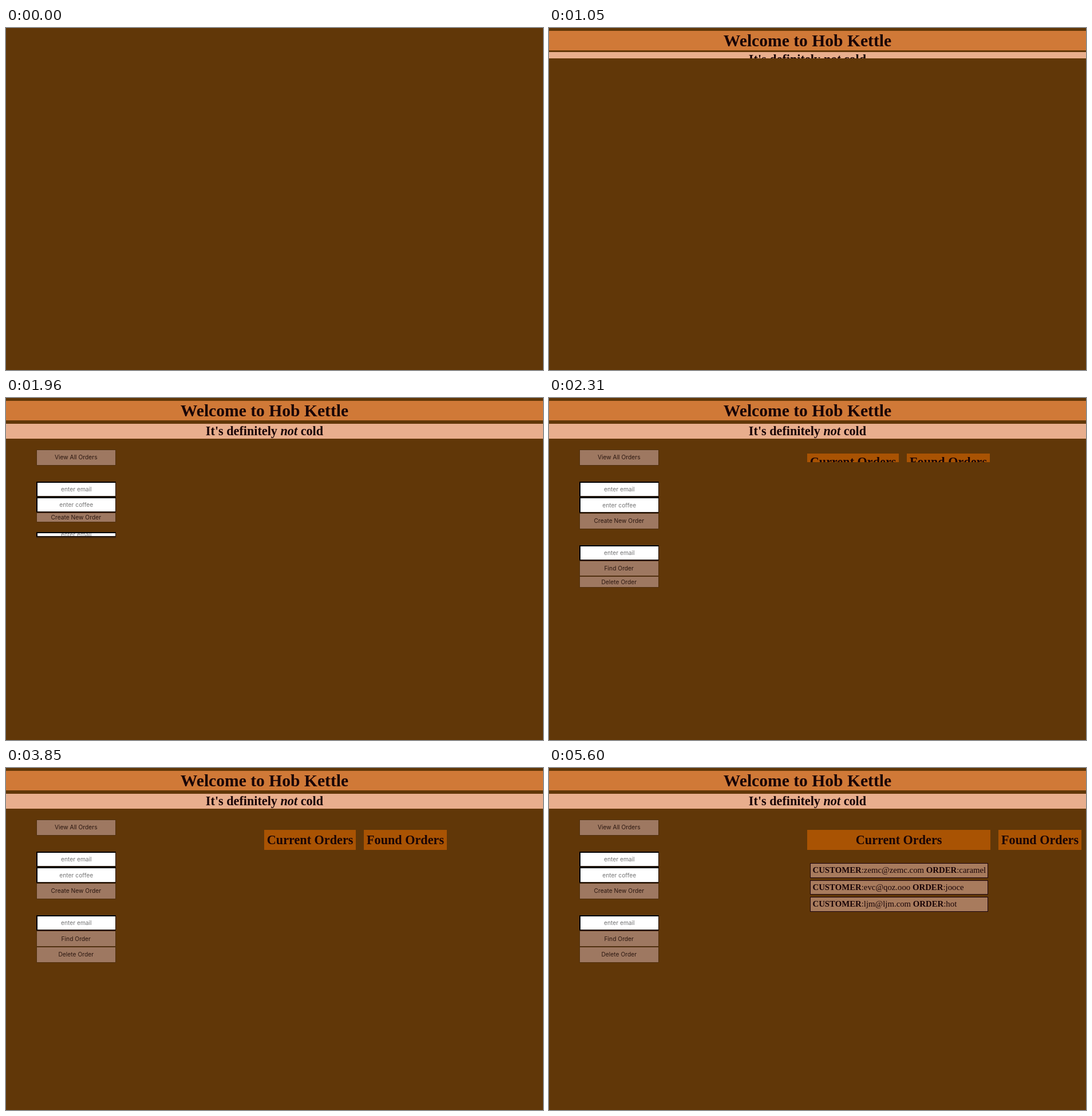
Animation of 938x597 px, one loop 5.74 s. Source, as an HTML page:

```html
<!DOCTYPE html>
<html lang="en">
<head>
<meta charset="utf-8">
<title>Coffee orders</title>
<style>
  html, body { margin: 0; width: 100%; height: 100%; overflow: hidden; background: #613708; }
  body { position: relative; font: 14.8px "Liberation Serif", "Times New Roman", serif; color: #190407; }
  h1, h2 { margin: 0; box-sizing: content-box; overflow: hidden; white-space: nowrap; text-align: center; }
  .banner { position: absolute; top: 0; left: 0; width: 938px; display: flex; flex-direction: column; }
  .banner > * { padding-right: 35px; }
  h1 { height: 34px; margin-top: 5px; font-size: 29.6px; line-height: 34px; background: #d07937; }
  h2 { font-size: 22.2px; }
  .banner h2 { height: 26px; margin-top: 6px; line-height: 26px; background: #e8ae8d; }

  .controls { position: absolute; left: 53px; top: 90px; width: 138.5px; display: flex; flex-direction: column; }
  .button, .field {
    display: flex; flex: none; align-items: center; justify-content: center; overflow: hidden;
    font: 10.25px/13px Inter, sans-serif; white-space: nowrap; border: 1px solid;
  }
  .button { height: 25.75px; background: #9e7861; color: #2b1710; border-color: #50300f; }
  .field { height: 23.75px; background: #fff; color: #757575; border-width: 2px; border-color: #000 #22140a #22140a #000; border-right-width: 1px; }
  .gap { margin-bottom: 27.75px; }

  .lists { position: absolute; left: 451px; top: 89px; display: flex; align-items: flex-start; gap: 14px; }
  .lists h2 { flex: none; height: 25.5px; line-height: 25.5px; margin-top: 19px; padding: 4.75px 4.6px; background: #a95303; }
  #current { width: 151px; }
  #found { width: 135.5px; }
  #orders { position: absolute; left: 456px; top: 166px; width: 311px; }
  #orders div {
    box-sizing: border-box; height: 25.5px; margin-bottom: 4px; padding-left: 3.5px;
    border: 1px solid #1c0512; background: #a87b5d; line-height: 23px; white-space: nowrap;
  }
</style>
</head>
<body>
  <div class="banner">
    <h1 id="title">Welcome to Hob Kettle</h1>
    <h2 id="tagline">It's definitely <em>not</em> cold</h2>
  </div>

  <div class="controls">
    <div class="button gap" id="viewAll">View All Orders</div>
    <div class="field">enter email</div>
    <div class="field">enter coffee</div>
    <div class="button gap">Create New Order</div>
    <div class="field">enter email</div>
    <div class="button">Find Order</div>
    <div class="button">Delete Order</div>
  </div>

  <div class="lists">
    <h2 id="current">Current Orders</h2>
    <h2 id="found">Found Orders</h2>
  </div>

  <div id="orders">
    <div><b>CUSTOMER</b>:zemc@zemc.com <b>ORDER</b>:caramel</div>
    <div><b>CUSTOMER</b>:evc@qoz.ooo <b>ORDER</b>:jooce</div>
    <div><b>CUSTOMER</b>:ljm@ljm.com <b>ORDER</b>:hot</div>
  </div>

<script>
  const LOOP = 5740;
  const SWING = 'cubic-bezier(.364, 0, .636, 1)';
  const SIZES = ['height', 'marginTop', 'marginBottom', 'paddingTop', 'paddingBottom'];
  const BORDERS = ['borderTopWidth', 'borderBottomWidth'];
  const byId = id => document.getElementById(id);

  // Each step is [time in ms, styles]
  function play(el, steps) {
    const frames = steps.map(([ms, style]) => ({ offset: ms / LOOP, ...style }));
    el.animate(frames, { duration: LOOP, iterations: Infinity });
  }

  function jump(el, ms, before, after) {
    play(el, [[0, before], [ms, before], [ms, after], [LOOP, after]]);
  }

  // Slide down: height, margins and padding grow together
  function slide(el, start, length) {
    const style = getComputedStyle(el);
    const pick = keys => Object.fromEntries(keys.map(k => [k, style[k]]));
    const zero = keys => Object.fromEntries(keys.map(k => [k, '0px']));
    const hidden = { ...zero(SIZES), ...zero(BORDERS), visibility: 'hidden' };
    const edge = { ...pick(BORDERS), visibility: 'visible' };
    const open = { ...pick(SIZES), ...edge };
    play(el, [
      [0, hidden], [start, hidden],
      [start, { ...zero(SIZES), ...edge, easing: SWING }],
      [start + length, open], [LOOP, open]
    ]);
  }

  slide(byId('title'), 310, 490);
  slide(byId('tagline'), 780, 600);
  document.querySelectorAll('.controls > div').forEach((el, i) => slide(el, 1405 + i * 109, 400));
  slide(byId('current'), 2128, 400);
  slide(byId('found'), 2128, 400);

  const idle = { backgroundColor: '#9e7861', color: '#2b1710', borderColor: '#50300f' };
  const hover = { backgroundColor: '#432716', color: '#fff', borderColor: '#fff' };
  play(byId('viewAll'), [[0, idle], [4020, idle], [4160, hover], [4510, hover], [4650, idle], [LOOP, idle]]);

  jump(byId('current'), 4200, { width: '151px' }, { width: '311px' });
  jump(byId('orders'), 4200, { visibility: 'hidden' }, { visibility: 'visible' });
</script>
</body>
</html>
```
